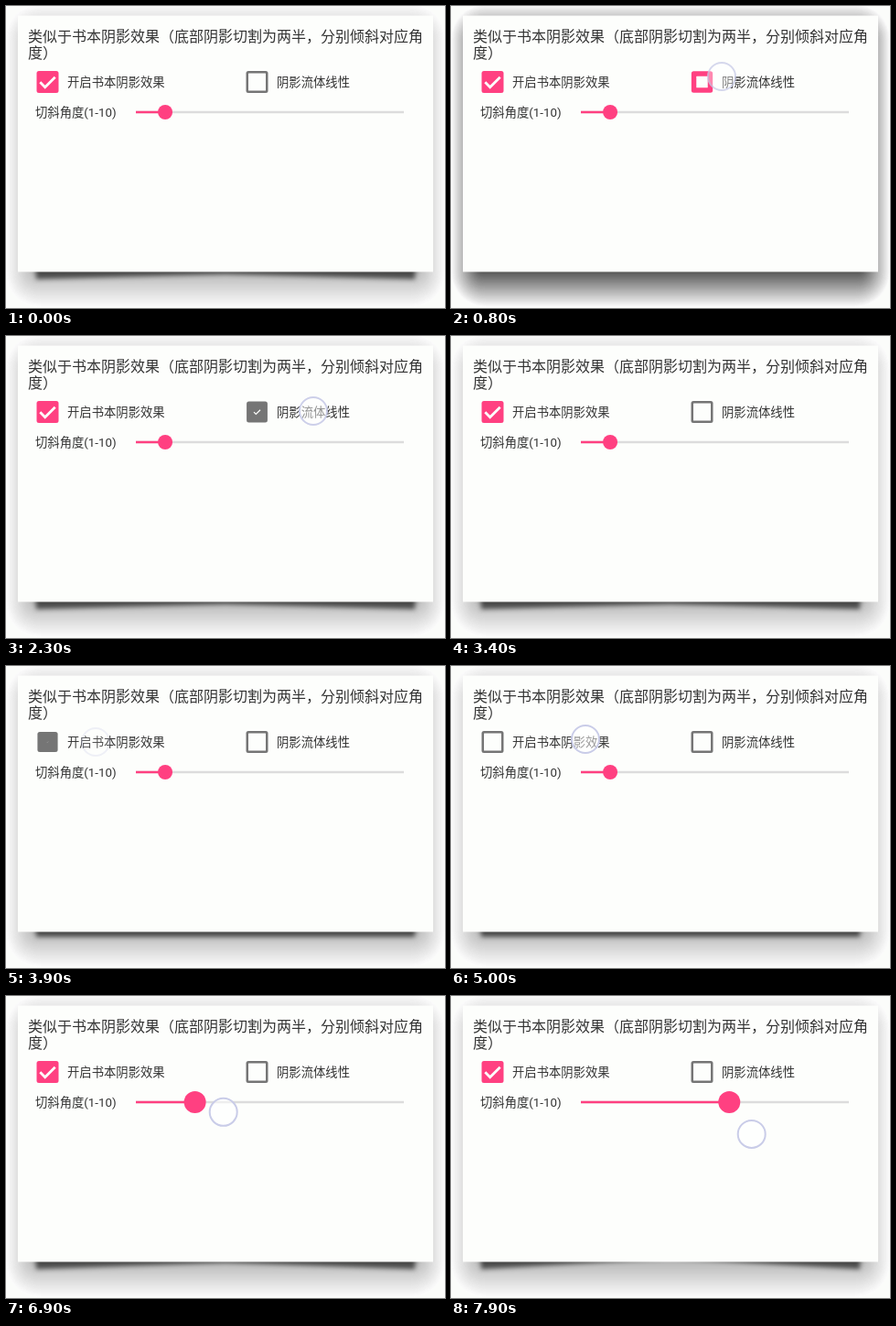
An HTML page with a canvas that plays this animation: 480x330 px, repeating every 8 s.

```html
<!DOCTYPE html>
<html lang="zh-CN">
<head>
<meta charset="utf-8">
<title>阴影效果</title>
<style>
  html, body { margin: 0; width: 100%; height: 100%; overflow: hidden; background: #fbfcfa; }
  canvas, svg { position: absolute; left: 0; top: 0; width: 480px; height: 330px; }
  text { font-family: Roboto, "Noto Sans CJK SC", "Noto Sans CJK", sans-serif; fill: #333; font-size: 13.33px; }
  .title { font-size: 16px; }
  .tick { fill: none; stroke: #fdfefc; stroke-width: 2.8; }
</style>
</head>
<body>
<canvas width="480" height="330"></canvas>
<svg viewBox="0 0 480 330">
  <rect x="13" y="10.5" width="454" height="280" fill="#fdfefc"/>
  <text class="title" x="24" y="38.5">类似于书本阴影效果（底部阴影切割为两半，分别倾斜对应角</text>
  <text class="title" x="24" y="57">度）</text>
  <g class="box" transform="translate(45.5 83)"><rect class="fill"/><rect class="hole" fill="#fdfefc"/><path class="tick" d="M-8.2 .3L-2.8 5.7L8.2 -5.3"/></g>
  <text x="67" y="88">开启书本阴影效果</text>
  <g class="box" transform="translate(274.5 83)"><rect class="fill"/><rect class="hole" fill="#fdfefc"/><path class="tick" d="M-8.2 .3L-2.8 5.7L8.2 -5.3"/></g>
  <text x="296" y="88">阴影流体线性</text>
  <text x="32" y="121">切斜角度(1-10)</text>
  <path d="M142 116H435" stroke="#dcdcdc" stroke-width="2.6"/>
  <path id="track" stroke="#ff4081" stroke-width="2.6"/>
  <circle id="thumb" cy="116" fill="#ff4081"/>
  <circle id="touch" r="15" fill="#fff" fill-opacity=".5" stroke="#c9cce8" stroke-width="2"/>
</svg>
<script>
const LOOP = 8000, STEP = 100, FADE = 250;
const ctx = document.querySelector('canvas').getContext('2d');
const boxes = [...document.querySelectorAll('.box')];
const track = document.getElementById('track');
const thumb = document.getElementById('thumb');
const touch = document.getElementById('touch');

const taps = [
  { x: 296, y: 77, down: 680, flip: 740, up: 740, box: 1, on: true },
  { x: 336, y: 82, down: 2180, flip: 2200, up: 2280, box: 1, on: false },
  { x: 98, y: 83, down: 3680, flip: 3740, up: 3720, box: 0, on: false },
  { x: 147, y: 80, down: 4960, flip: 5060, up: 5060, box: 0, on: true }
];
const drag = { start: 6200, x: 174, y: 110, vx: 0.091, vy: 0.0241 };

const clamp = v => Math.max(0, Math.min(1, v));
const mix = (a, b, u) => a + (b - a) * u;
const set = (el, attrs) => { for (const k in attrs) el.setAttribute(k, attrs[k]); };

// Nested rounded rects, from the faint rim to the dark core.
function paintShadow(fluid, book, angle) {
  ctx.fillStyle = '#fbfcfa';
  ctx.fillRect(0, 0, 480, 330);
  for (let i = 0; i <= 80; i++) {
    const u = i / 80;
    const dark = fluid ? 0.68 * u : 0.28 * u;
    const x = mix(0, 32, u), y = mix(-2, 40, u), bottom = mix(329, 289, u);
    const g = Math.round(252 * (1 - dark));
    ctx.fillStyle = `rgb(${g},${g},${g})`;
    ctx.beginPath();
    ctx.roundRect(x, y, 480 - 2 * x, bottom - y, mix(38, 3, u));
    ctx.fill();
  }
  if (fluid) return;
  const edge = book ? 298.5 : 296;
  const mid = book ? edge - 2.4 - 1.6 * angle : edge;
  ctx.save();
  ctx.filter = 'blur(2.5px)';
  ctx.fillStyle = 'rgba(0,0,0,.6)';
  ctx.beginPath();
  ctx.moveTo(31, 270);
  ctx.lineTo(33, edge);
  ctx.lineTo(240, mid);
  ctx.lineTo(447, edge);
  ctx.lineTo(449, 270);
  ctx.fill();
  ctx.restore();
}

// p runs from 0 (empty outline) to 1 (ticked).
function drawBox(box, p, pink) {
  const [fill, hole, tick] = box.children;
  const square = (el, s, r) => set(el, { x: -s / 2, y: -s / 2, width: s, height: s, rx: r });
  square(fill, 24 - 2 * (1 - Math.abs(2 * p - 1)), 2.5);
  square(hole, 19 * clamp(1 - 2 * p), 0.5);
  fill.setAttribute('fill', pink ? '#ff4081' : '#757575');
  const s = clamp(2 * p - 1);
  set(tick, { transform: `scale(${s})`, visibility: s ? 'visible' : 'hidden' });
}

function boxState(i, t) {
  let on = i === 0, p = on ? 1 : 0;
  for (const tap of taps) {
    if (tap.box !== i || t < tap.flip) continue;
    on = tap.on;
    const k = clamp((t - tap.flip) / 350);
    p = on ? k : 1 - k;
  }
  return { on, p };
}

let shown = '';
function render(t) {
  const state = boxes.map((b, i) => boxState(i, t));
  state.forEach((s, i) => drawBox(boxes[i], s.p, s.on));

  const dt = t - drag.start, held = dt >= 0;
  const fx = drag.x + drag.vx * dt, fy = drag.y + drag.vy * dt;
  const notch = 293 / 9;
  const value = held ? Math.max(1, Math.floor((fx - 142) / notch)) : 1;
  const tx = 142 + value * notch - 0.5;
  set(thumb, { cx: tx, r: mix(8, 12, clamp((dt + 50) / 150)) });
  track.setAttribute('d', `M142 116H${tx}`);

  const tap = taps.find(a => t >= a.down && t < a.up + FADE);
  if (held) set(touch, { cx: fx, cy: fy, opacity: 1 });
  else if (tap) set(touch, { cx: tap.x, cy: tap.y, opacity: 1 - clamp((t - tap.up) / FADE) });
  else touch.setAttribute('opacity', 0);

  const key = [state[1].on, state[0].on, value].join();
  if (key !== shown) {
    shown = key;
    paintShadow(state[1].on, state[0].on, value + 1);
  }
}

const begin = performance.now();
function tick() {
  const t = (performance.now() - begin) % LOOP;
  render(Math.floor(t / STEP) * STEP);
  requestAnimationFrame(tick);
}
tick();
</script>
</body>
</html>
```
